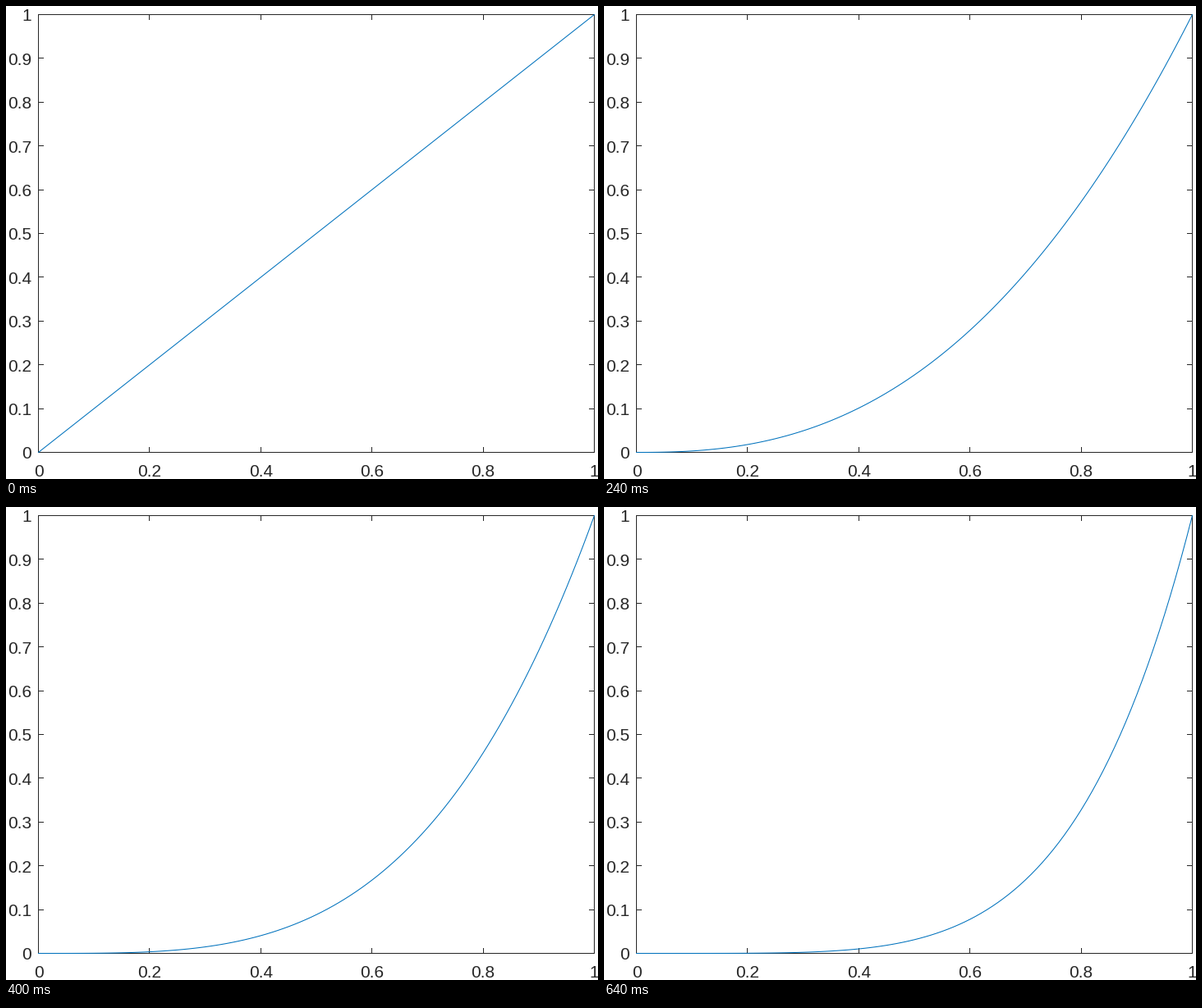
These frames come from a looping animation (721 px wide and 577 px high, 0.72 s). A matplotlib script:

```python
import numpy as np
import matplotlib.pyplot as plt
from matplotlib.animation import FuncAnimation

W, H, DPI = 721, 577, 64
PX = 72 / DPI  # points per pixel
LEFT, RIGHT, TOP, BOTTOM = 39, 716, 10, 544
INK, BLUE = "#262626", "#0072BD"
FONT_PX = 20.83
TICK = 7
FRAMES, INTERVAL = 9, 80

fig = plt.figure(figsize=(W / DPI, H / DPI), dpi=DPI, facecolor="white")
ax = fig.add_axes([0, 0, 1, 1])
ax.set(xlim=(0, W), ylim=(H, 0))
ax.axis("off")


def to_x(u):
    return LEFT + (RIGHT - LEFT) * u


def to_y(v):
    return BOTTOM - (BOTTOM - TOP) * v


def rule(x0, y0, x1, y1):
    """One-pixel line through pixel centres, kept off matplotlib's snapping."""
    ax.plot([x0 + 0.5, x1 + 0.5], [y0 + 0.5, y1 + 0.5], color=INK, lw=PX,
            solid_capstyle="projecting", snap=False)


def label(value, x, baseline, align):
    """Place a number by its advance width; align is 0.5 centre, 1 right."""
    text = f"{value:g}"
    advance = FONT_PX * sum(0.278 if c == "." else 0.556 for c in text)
    ax.text(x - align * advance, baseline, text, color=INK,
            family="Liberation Sans", fontsize=FONT_PX * PX,
            ha="left", va="baseline")


for y in (TOP, BOTTOM):
    rule(LEFT, y, RIGHT, y)
for x in (LEFT, RIGHT):
    rule(x, TOP, x, BOTTOM)

for i in range(6):
    x = round(to_x(i / 5))
    rule(x, BOTTOM, x, BOTTOM - TICK + 1)
    rule(x, TOP, x, TOP + TICK - 1)
    label(i / 5, to_x(i / 5) + 0.5, 574, 0.5)

for i in range(11):
    y = round(to_y(i / 10))
    rule(LEFT, y, LEFT + TICK - 1, y)
    rule(RIGHT, y, RIGHT - TICK + 1, y)
    label(i / 10, 31, to_y(i / 10) + 8.4, 1)

t = np.linspace(0, 1, 101)
curve, = ax.plot([], [], color=BLUE, lw=1.04 * PX, zorder=3, snap=False)


def update(frame):
    power = 1 + frame / 2
    curve.set_data(to_x(t) + 0.5, to_y(t ** power) + 0.5)
    return curve,


anim = FuncAnimation(fig, update, frames=FRAMES, interval=INTERVAL,
                     repeat=True, repeat_delay=0, blit=False)
plt.show()
```
